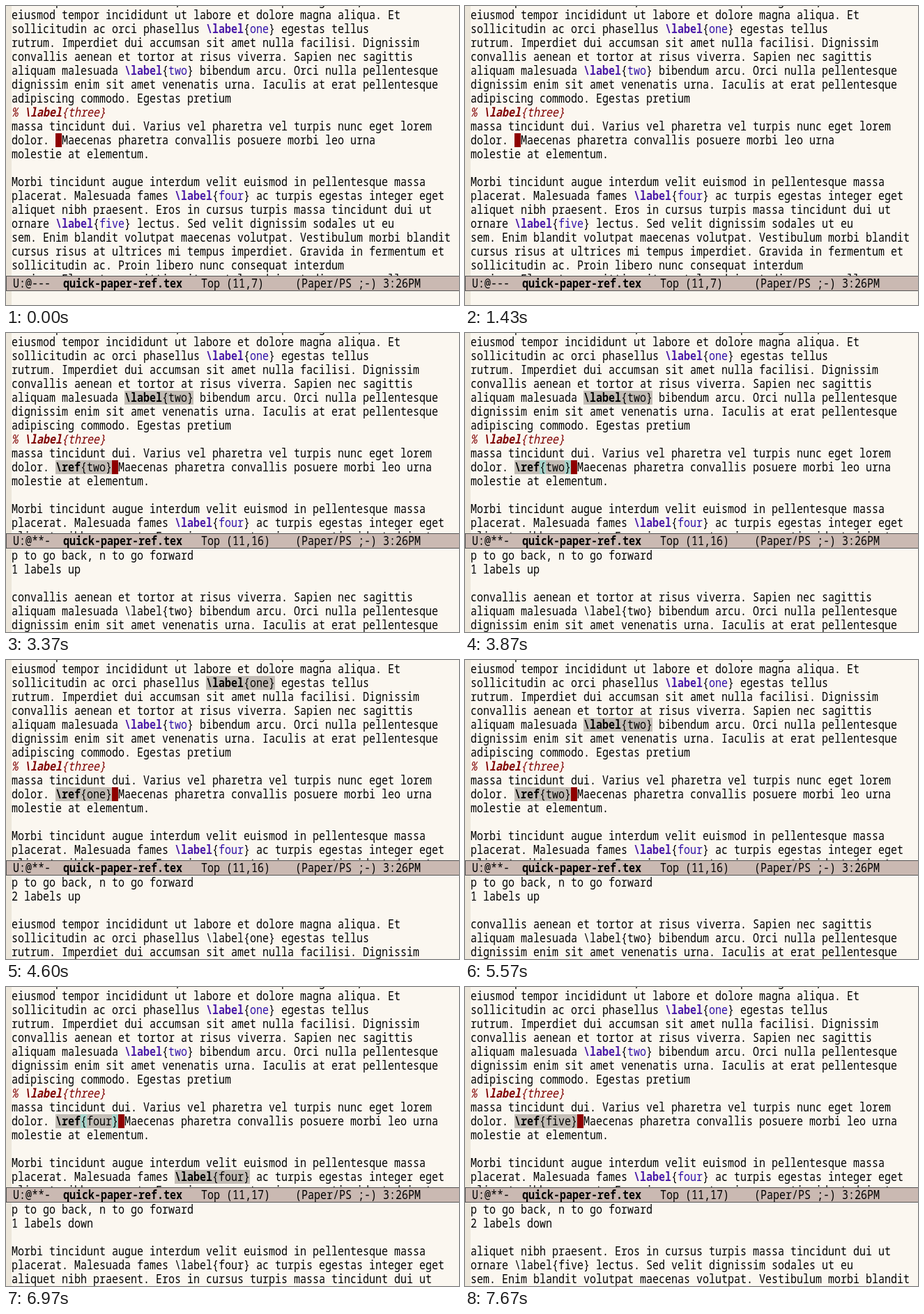
An HTML page with a canvas that plays this animation: 650 px wide and 430 px high, repeating every 8 s.

```html
<!DOCTYPE html>
<html lang="en">
<head>
<meta charset="utf-8">
<style>
  html, body { margin: 0; width: 100%; height: 100%; overflow: hidden; background: #fbf7f0; }
  canvas { display: block; }
</style>
</head>
<body>
<canvas id="stage" width="650" height="430"></canvas>
<script>
const ctx = document.getElementById('stage').getContext('2d');
const COL = 9, ROW = 20, LEFT = 8, LOOP = 8000, REF_LINE = 10;
const color = {
  paper: '#fbf7f0', fringe: '#ece6da', ink: '#000', bar: '#cab9b2', edge: '#545454',
  macro: '#4a1aa8', name: '#3010a8', comment: '#7f0000', cursor: '#8f0000',
  match: '#c2bcb5', paren: '#a6d3ca'
};

const lines = String.raw`Lorem ipsum dolor sit amet, consectetur adipiscing elit, sed do
eiusmod tempor incididunt ut labore et dolore magna aliqua. Et
sollicitudin ac orci phasellus \label{one} egestas tellus
rutrum. Imperdiet dui accumsan sit amet nulla facilisi. Dignissim
convallis aenean et tortor at risus viverra. Sapien nec sagittis
aliquam malesuada \label{two} bibendum arcu. Orci nulla pellentesque
dignissim enim sit amet venenatis urna. Iaculis at erat pellentesque
adipiscing commodo. Egestas pretium
% \label{three}
massa tincidunt dui. Varius vel pharetra vel turpis nunc eget lorem
dolor. @ Maecenas pharetra convallis posuere morbi leo urna
molestie at elementum.

Morbi tincidunt augue interdum velit euismod in pellentesque massa
placerat. Malesuada fames \label{four} ac turpis egestas integer eget
aliquet nibh praesent. Eros in cursus turpis massa tincidunt dui ut
ornare \label{five} lectus. Sed velit dignissim sodales ut eu
sem. Enim blandit volutpat maecenas volutpat. Vestibulum morbi blandit
cursus risus at ultrices mi tempus imperdiet. Gravida in fermentum et
sollicitudin ac. Proin libero nunc consequat interdum
varius. Elementum sagittis vitae et leo duis ut diam quam nulla`.split('\n');

// Braces light up about half a second after each choice.
const steps = [
  { at: 0, barTop: 388 },
  { at: 2130, barTop: 368, help: true },
  { at: 3370, pick: 'two', status: '1 labels up', parenAt: 3870 },
  { at: 4600, pick: 'one', status: '2 labels up', parenAt: 5030 },
  { at: 5570, pick: 'two', status: '1 labels up', parenAt: 6070 },
  { at: 6470, pick: 'four', status: '1 labels down', parenAt: 6970 },
  { at: 7670, pick: 'five', status: '2 labels down', parenAt: LOOP }
];

function box(x, y, w, h, fill) {
  ctx.fillStyle = fill;
  ctx.fillRect(x, y, w, h);
}

// Tall, narrow terminal lettering; y is the top of the text row.
function write(text, x, y, fill = color.ink, style = '') {
  ctx.save();
  ctx.translate(x, y + 16);
  ctx.scale(1, 1.2);
  ctx.font = `${style} 15px "Noto Sans Mono", monospace`;
  ctx.fillStyle = fill;
  ctx.fillText(text, 0, 0);
  ctx.restore();
}

function drawLine(text, y, pick, paren) {
  const isComment = text.startsWith('%');
  const slant = isComment ? 'italic ' : '';
  const ink = isComment ? color.comment : color.ink;
  let x = LEFT;
  const run = (part, fill = ink, style = '') => {
    write(part, x, y, isComment ? ink : fill, slant + style);
    x += part.length * COL;
  };
  for (const part of text.split(/(\\\w+\{\w+\})/)) {
    const found = part.match(/^(\\\w+)\{(\w+)\}$/);
    if (!found) { run(part); continue; }
    const [, macro, name] = found;
    const chosen = name === pick;
    if (chosen) box(x, y, part.length * COL, ROW, color.match);
    if (paren && macro === '\\ref') {
      box(x + macro.length * COL, y, COL, ROW, color.paren);
      box(x + (part.length - 1) * COL, y, COL, ROW, color.paren);
    }
    run(macro, chosen ? ink : color.macro, 'bold');
    run('{');
    run(name, chosen ? ink : color.name);
    run('}');
  }
}

function drawBar(top, column, edited) {
  box(0, top, 650, 22, color.edge);
  box(1, top + 1, 649, 20, color.bar);
  const put = (text, col, style) => write(text, 10 + col * COL, top + 1, color.ink, style);
  put(edited ? 'U:@**-' : 'U:@---', 0);
  put('quick-paper-ref.tex', 8, 'bold');
  put(`Top (11,${column})`, 30);
  put('(Paper/PS ;-) 3:26PM', 45);
}

function draw(time) {
  const step = steps.findLast(s => s.at <= time);
  const { pick, barTop = 288 } = step;
  const ref = pick ? `\\ref{${pick}}` : '';
  const column = 7 + ref.length;

  box(0, 0, 650, 430, color.paper);
  box(0, 0, LEFT, 430, color.fringe);

  ctx.save();
  ctx.beginPath();
  ctx.rect(0, 0, 650, barTop);
  ctx.clip();
  lines.forEach((text, i) =>
    drawLine(text.replace('@', ref), i * ROW - 17, pick, time >= step.parenAt));
  box(LEFT + column * COL, REF_LINE * ROW - 17, COL, ROW, color.cursor);
  ctx.restore();

  drawBar(barTop, column, !!pick);

  const messages = [];
  if (pick || step.help) messages.push('p to go back, n to go forward');
  if (pick) {
    const at = lines.findIndex(text => text.includes(`{${pick}}`));
    messages.push(step.status, '', ...lines.slice(at - 1, at + 2));
  }
  messages.forEach((text, i) => write(text, LEFT, barTop + 22 + i * ROW));
}

function tick() {
  draw(performance.now() % LOOP);
  requestAnimationFrame(tick);
}
tick();
</script>
</body>
</html>
```
